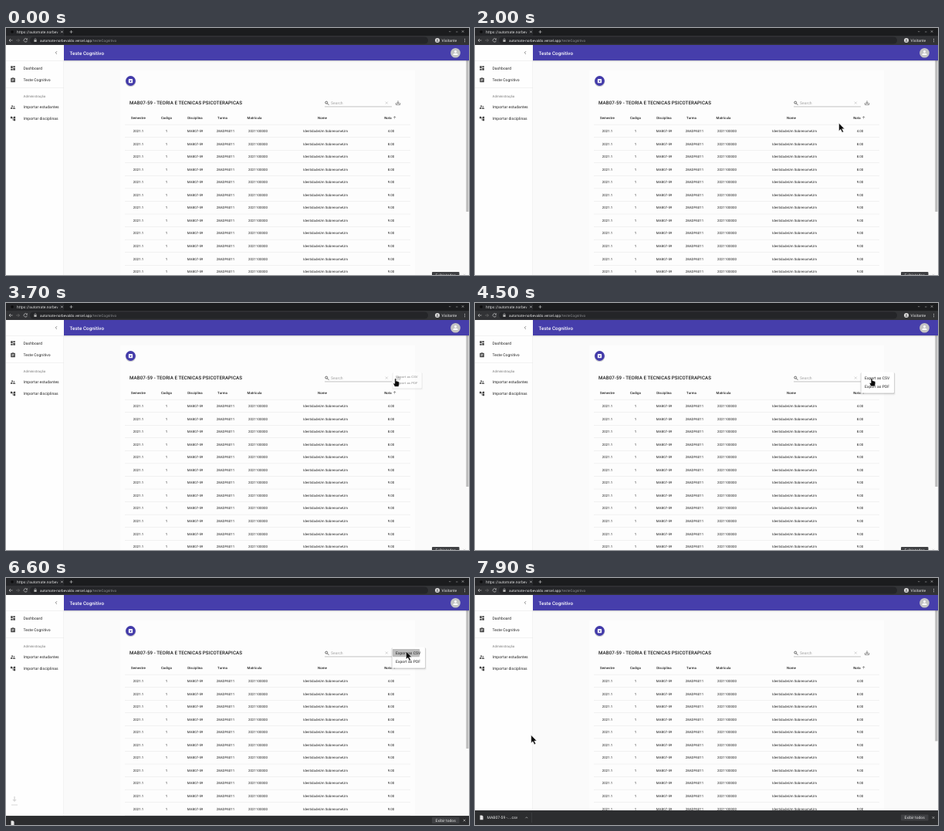
Write an HTML page that moves like this. It is 600 px wide and 320 px high and loops after 8 s.

```html
<!DOCTYPE html>
<html lang="pt">
<head>
<meta charset="utf-8">
<style>
  html, body { margin: 0; width: 100%; height: 100%; overflow: hidden; background: #fafafa; }
  svg { display: block; width: 600px; height: 320px; font-family: Roboto, "Open Sans", sans-serif; text-rendering: geometricPrecision; }
</style>
</head>
<body>
<svg id="stage" viewBox="0 0 600 320"></svg>
<script>
const stage = document.getElementById('stage');
const LOOP = 8000;

const icons = {
  dashboard: 'M3 13h8V3H3zm0 8h8v-6H3zm10 0h8V11h-8zm0-18v6h8V3z',
  clipboard: 'M19 3h-4.2a3 3 0 0 0-5.6 0H5a2 2 0 0 0-2 2v14c0 1.1.9 2 2 2h14a2 2 0 0 0 2-2V5a2 2 0 0 0-2-2zm-7 0a1 1 0 0 1 0 2 1 1 0 0 1 0-2zm2 14H7v-2h7zm3-4H7v-2h10zm0-4H7V7h10z',
  people: 'M16.5 12a2.5 2.5 0 1 0 0-5 2.5 2.5 0 0 0 0 5zM9 11a3 3 0 1 0 0-6 3 3 0 0 0 0 6zm7.5 3c-1.8 0-5.5.9-5.5 2.75V19h11v-2.25C22 14.9 18.3 14 16.5 14zM9 13c-2.3 0-7 1.2-7 3.5V19h7v-2.25c0-.85.3-2.3 2.4-3.5Q10 13 9 13z',
  tree: 'M22 11V3h-7v3H9V3H2v8h7V8h2v10h4v3h7v-8h-7v3h-2V8h2v3z',
  archive: 'M20.5 5.2 19 3.5 18 3H6l-1.2.5-1.3 1.7L3 6.5V19a2 2 0 0 0 2 2h14a2 2 0 0 0 2-2V6.5zM12 17.5 6.5 12H10v-2h4v2h3.5z',
  download: 'M19 12v7H5v-7H3v7c0 1.1.9 2 2 2h14a2 2 0 0 0 2-2v-7zm-6 .7 2.6-2.6 1.4 1.4-5 5-5-5 1.4-1.4 2.6 2.6V3h2z',
  up: 'm4 12 1.4 1.4L11 7.8V20h2V7.8l5.6 5.6L20 12l-8-8z',
  person: 'M12 12a4 4 0 1 0 0-8 4 4 0 0 0 0 8zm0 2c-2.7 0-8 1.3-8 4v2h16v-2c0-2.7-5.3-4-8-4z',
  file: 'M5 2h9l5 5v15H5z'
};

// All helpers place things by their vertical centre.
const icon = (name, x, y, size, fill) =>
  `<path d="${icons[name]}" fill="${fill}" transform="translate(${x} ${y}) scale(${size / 24}) translate(-12 -12)"/>`;
const text = (str, x, y, size, fill = '#222', more = '') =>
  `<text x="${x}" y="${y + size * .355}" font-size="${size}" fill="${fill}" letter-spacing="${size * .0095}" ${more}>${str}</text>`;
const rect = (x, y, w, h, fill, more = '') =>
  `<rect x="${x}" y="${y}" width="${w}" height="${h}" fill="${fill}" ${more}/>`;
const line = (d, color, width = .6) =>
  `<path d="${d}" fill="none" stroke="${color}" stroke-width="${width}"/>`;
const cross = (x, y, r, color) =>
  line(`M${x - r} ${y - r}l${2 * r} ${2 * r}m0 ${-2 * r}l${-2 * r} ${2 * r}`, color);

const mid = 'text-anchor="middle"', bold = 'font-weight="500"';

function browser() {
  return rect(0, 0, 600, 10, '#1b1c1e') + rect(0, 0, 75, 10, '#242528') + rect(0, 10, 600, 12, '#323336') +
    rect(31, 11.5, 516, 9, '#242528', 'rx="4.5"') +
    '<circle cx="8" cy="5" r="1.8" fill="#0c0c0d"/>' +
    text('https://automate.norbev', 14, 5, 4.9, '#dedede') + rect(67, 1, 3, 8, '#242528', 'opacity=".7"') +
    cross(72.5, 5, 1.3, '#ddd') + line('M82.5 5h4m-2-2v4', '#ccc') +
    line('M8.5 16h-4.500m2-2l-2 2l2 2', '#ddd') + line('M13 16h4.500m-2-2l2 2l-2 2', '#777') +
    line('M27 14.500a2.200 2.200 0 1 0 .4 2m0-3v1.500h-1.500', '#ddd') +
    rect(36.4, 15.3, 3.2, 2.6, '#bbb') + line('M37 15.500v-1a1 1 0 0 1 2 0v1', '#bbb', .5) +
    text('automate-norbevaldo.vercel.app<tspan fill="#8d8f92">/testeCognitivo</tspan>', 44, 16, 4.6, '#eee') +
    '<circle cx="559" cy="16" r="3" fill="#ddd"/>' + icon('person', 559, 16, 4.5, '#444') +
    text('Visitante', 564.5, 16, 4.9, '#eee') +
    [14.2, 16, 17.8].map(y => `<circle cx="594.500" cy="${y}" r=".5" fill="#ddd"/>`).join('') +
    line('M574 4l1.200 1.200l1.200-1.200M583 5h2.500', '#bbb', .5) + cross(592, 4.5, 1.2, '#ccc');
}

function sidebar() {
  const item = (name, label, y) => icon(name, 9, y, 7.5, '#444') + text(label, 22.5, y, 5, '#222');
  return rect(0, 22, 75, 298, '#fefefe') + rect(74.6, 42, .4, 278, '#e4e4e4') +
    line('M66 30.200l-1.800 1.800l1.800 1.800', '#444') + rect(0, 42, 75, .4, '#ddd') +
    item('dashboard', 'Dashboard', 52) + item('clipboard', 'Teste Cognitivo', 67.5) +
    rect(0, 77, 75, .4, '#ddd') + text('Administração', 22.5, 88, 4.375, '#777') +
    item('people', 'Importar estudantes', 102.5) + item('tree', 'Importar disciplinas', 117.5);
}

function table() {
  const heads = [['Semestre', 171.5], ['Codigo', 208], ['Disciplina', 245], ['Turma', 280.5],
    ['Matrícula', 322], ['Nome', 410], ['Nota', 495]];
  const xs = [171.5, 208, 245, 284.5, 326.5, 414, 499];
  let out = heads.map(([s, x]) => text(s, x, 116, 4.375, '#222', mid + bold.padStart(18))).join('') +
    icon('up', 503.7, 116, 5, '#555');
  for (let i = 0; i < 12; i++) {
    const y = 133.4 + i * 16.56;
    const grade = i === 0 ? '4.00' : i < 4 ? '8.00' : '9.00';
    const cells = ['2021.1', '1', 'MAB07-59', '28ADPA011', '2021100000', 'IdentidadeUm SobrenomeUm', grade];
    out += rect(154, y - 8.5, 370, .4, '#dedede') +
      cells.map((s, k) => text(s, xs[k], y, 4.375, '#222', mid)).join('');
  }
  return out;
}

function page() {
  return rect(75, 42, 525, 278, '#fafafa') + rect(148, 55, 382, 265, '#fdfdfd') +
    '<circle cx="161.500" cy="69.500" r="6.800" fill="#000" opacity=".16"/>' +
    '<circle cx="161.500" cy="68.500" r="6.400" fill="#443caa"/>' + icon('archive', 161.5, 68.5, 7, '#fff') +
    text('MAB07-59 - TEORIA E TECNICAS PSICOTERAPICAS', 160, 97.2, 6.2, '#1c1c1c', bold) +
    '<circle cx="415.200" cy="96.600" r="1.500" fill="none" stroke="#333" stroke-width=".7"/>' +
    line('M416.300 97.700l2 2', '#333', .8) + text('Search', 421, 97, 5, '#a2a2a2') +
    cross(493.3, 97, 1.5, '#bbb') + rect(413, 101.7, 87, .5, '#888') +
    icon('download', 508, 97, 7.5, '#444') + table() +
    '<rect id="thumb" x="596.300" y="22" width="3.200" fill="#bcbcbc"/>' +
    rect(75, 42, 525, .8, '#000', 'opacity=".18"') + rect(75, 42.8, 525, 1, '#000', 'opacity=".06"') +
    rect(75, 22, 525, 20, '#463eab') + text('Teste Cognitivo', 82.5, 32.3, 6.25, '#fff', bold) +
    '<circle cx="582.500" cy="32.200" r="6.300" fill="#c4c4c4"/>' + icon('person', 582.5, 32, 9, '#fff');
}

const menu = `<g id="menu">
  ${rect(498.8, 90.5, 46, 29, '#000', 'rx="2" opacity=".05"')}${rect(499.8, 90, 44, 28, '#000', 'rx="1.500" opacity=".13"')}
  ${rect(500.5, 89.7, 42.5, 26.8, '#fff', 'rx="1.200"')}
  <clipPath id="row"><rect x="500.500" y="92" width="42.500" height="10.200"/></clipPath>
  <circle id="ripple" cx="518.500" cy="97" fill="#bdbdbd" clip-path="url(#row)"/>
  ${text('Export as CSV', 505, 97, 5)}${text('Export as PDF', 505, 108.2, 5)}</g>`;

const shelf = `<g id="drop" fill="#bbb"><path d="M10.300-4h1.400v4h2l-2.700 3l-2.700-3h2z"/><rect x="7" y="6.500" width="8" height="1"/></g>
  <g id="shelf">${rect(0, 0, 600, 20, '#2c2d2f')}${rect(0, 0, 600, .4, '#48494c')}
  <clipPath id="reveal"><rect id="width" height="19"/></clipPath>
  <g clip-path="url(#reveal)">${icon('file', 8.5, 9.3, 7, '#e6e6e6')}${text('MAB07-59 -....csv', 15.5, 9.3, 5, '#e8e8e8')}
  ${line('M65.300 10.200l1.500-1.500l1.500 1.500', '#ccc')}${rect(73.5, 3, .4, 13, '#505154')}</g>
  <g id="tail">${rect(552, -4, 35.5, 8, '#3f4043', 'rx="1"')}${text('Exibir todos', 569.7, 0, 4.9, '#e8e8e8', mid)}
  ${cross(594, 0, 1.4, '#ccc')}</g></g>`;

const cursors = `<path id="arrow" d="M0 0v10.300l2.300-2.100l1.900 4l1.800-.9l-1.900-3.800h3.200z" fill="#0a0a0a" stroke="#fff" stroke-width=".5"/>
  <path id="hand" d="M-.9.500Q0-.500.9.500V3.300q1-.5 1.500.3q1-.4 1.300.5q1-.2 1.100.8V7.500L4 10.300H-1L-2.800 6.500q.5-1.200 1.900 0z" fill="#0a0a0a" stroke="#fff" stroke-width=".4"/>`;

stage.innerHTML = browser() + sidebar() + page() + menu + shelf + cursors;

const el = id => document.getElementById(id);
const set = (id, attrs) => { for (const k in attrs) el(id).setAttribute(k, attrs[k]); };
const ramp = (t, a, b) => Math.min(1, Math.max(0, (t - a) / (b - a)));
const easeOut = p => 1 - (1 - p) ** 3;

// Pointer path: time, x, y
const path = [[800, 31, 152], [1300, 359, 117], [1600, 445, 127], [1700, 464, 127], [1900, 465, 126],
  [2600, 511, 106], [2700, 510, 103], [2800, 508, 100], [3100, 504.5, 98], [4400, 505, 98],
  [4500, 514, 97.5], [5200, 530, 97], [5800, 530, 97], [5900, 521.5, 96], [6000, 519, 95.5],
  [6500, 518.5, 95], [7300, 518.5, 95], [7900, 72.7, 203.5]];

function pointer(t) {
  const i = path.findIndex(k => k[0] >= t);
  if (i < 1) return path[0].slice(1);
  const [a, x, y] = path[i - 1], [b, u, v] = path[i];
  let p = ramp(t, a, b);
  if (a === 7300) p = p * p * (3 - 2 * p);
  return [x + (u - x) * p, y + (v - y) * p];
}

function draw(t) {
  const [x, y] = pointer(t);
  const overLink = t >= 2800 && t < 6500;
  const move = `translate(${x} ${y})`;
  set('arrow', { transform: move, opacity: +(t >= 800 && !overLink) });
  set('hand', { transform: move, opacity: +overLink });

  const open = easeOut(ramp(t, 3620, 4000)), close = ramp(t, 6650, 6900);
  const s = .75 + .25 * open;
  set('menu', { opacity: open * (1 - close), transform: `translate(508 90) scale(${s} ${s * s}) translate(-508 -90)` });
  set('ripple', { r: 18 * Math.sqrt(ramp(t, 6400, 6600)) });

  const h = 19 * ramp(t, 6440, 6700) ** (t < 6700 ? .95 : 1);
  set('shelf', { transform: `translate(0 ${320 - h})` });
  set('tail', { transform: `translate(0 ${h / 2})` });
  set('width', { width: 80 * easeOut(ramp(t, 6560, 7300)) });
  set('drop', { transform: `translate(0 ${275 + 24 * ramp(t, 6400, 6800)})`, opacity: t < 6500 ? 0 : .75 * (1 - ramp(t, 6500, 6900)) });
  set('thumb', { height: 216 * ((298 - h) / 298) ** 2 });
}

function tick(now) {
  draw(Math.floor(now % LOOP / 100) * 100);
  requestAnimationFrame(tick);
}
draw(0);
requestAnimationFrame(tick);
</script>
</body>
</html>
```
